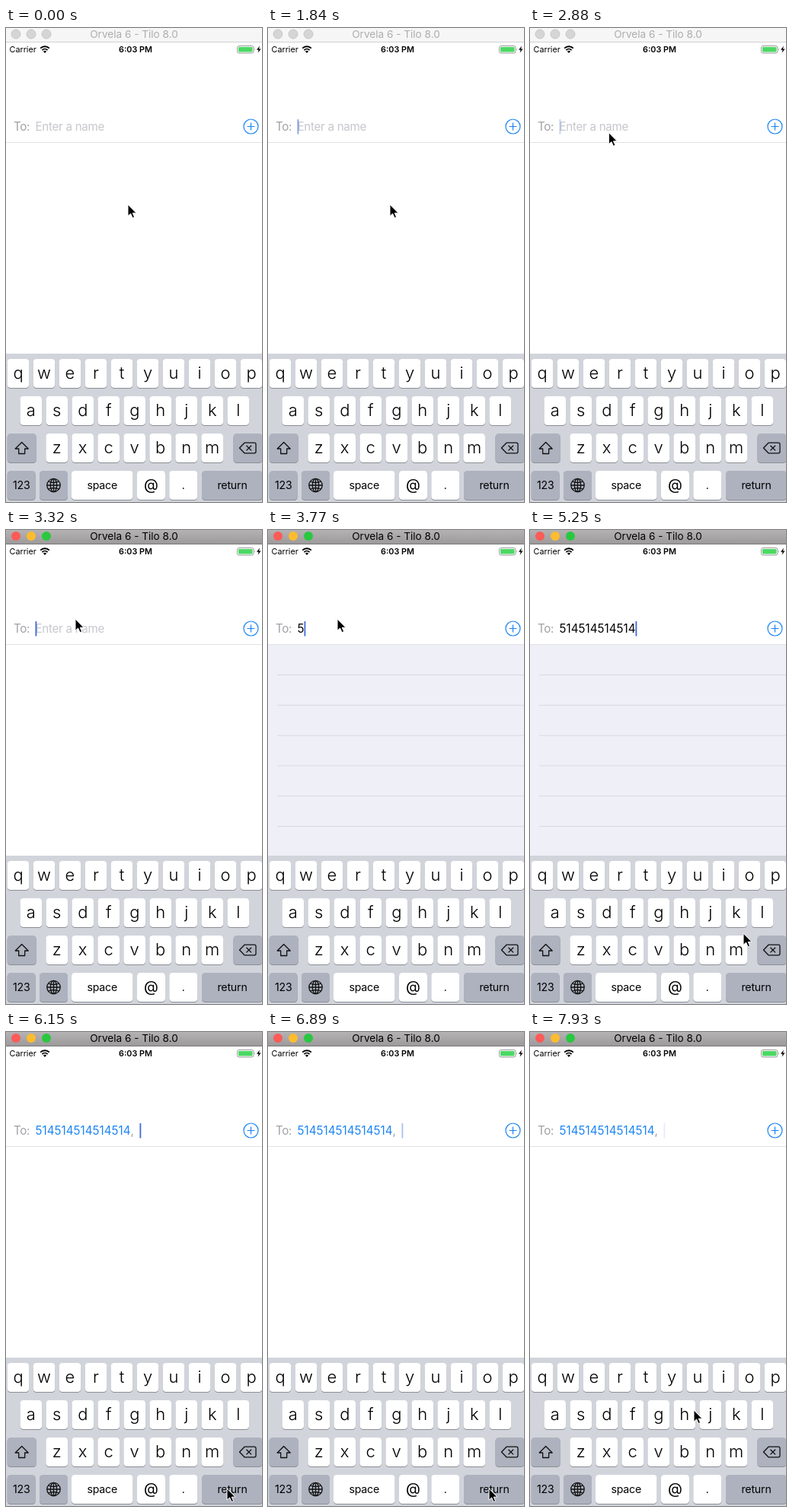
Write an HTML page that moves like this. It is 336x623 px and loops after 8 s.

```html
<!DOCTYPE html>
<html lang="en">
<head>
<meta charset="utf-8">
<title>Recipient field</title>
<style>
  html, body { margin: 0; height: 100%; overflow: hidden; background: #fff; }
  svg { display: block; width: 100vw; height: 100vh; font-family: Inter, Roboto, sans-serif; }
  .field { font-size: 15.2px; letter-spacing: -.3px; white-space: pre; }
  #entry { letter-spacing: 0; }
  .mid { text-anchor: middle; }
  .letter { font-size: 22px; font-weight: 300; }
  .sign { font-size: 19.5px; }
  .label { font-size: 14.2px; letter-spacing: -.2px; }
  .icon { fill: none; stroke: #111; stroke-width: 1.3; stroke-linejoin: round; }
</style>
</head>
<body>
<svg viewBox="0 0 336 623">
  <defs>
    <linearGradient id="chrome" x2="0" y2="1">
      <stop stop-color="#b5b2b4"/><stop offset="1" stop-color="#9d9a9c"/>
    </linearGradient>
  </defs>
  <rect width="336" height="623" fill="#fff"/>

  <rect id="bar" width="336" height="18"/>
  <rect id="barLine" y="18" width="336" height="1"/>
  <g id="lights">
    <circle cx="13" cy="8" r="6"/><circle cx="33" cy="8" r="6"/><circle cx="53" cy="8" r="6"/>
  </g>
  <text id="title" class="mid" x="168" y="13" font-size="13.6">Orvela 6 - Tilo 8.0</text>

  <g font-size="10.8">
    <text x="4.5" y="32">Carrier</text>
    <text class="mid" x="170" y="32" font-weight="600">6:03 PM</text>
  </g>
  <g fill="none" stroke="#000" stroke-width="1.9">
    <path d="M45.2 26.6a8.3 8.3 0 0 1 11.6 0M47.4 29.1a5.2 5.2 0 0 1 7.2 0"/>
    <path d="M51 33l-2.1-2.2a3 3 0 0 1 4.2 0z" fill="#000" stroke="none"/>
  </g>
  <rect x="303.5" y="23.5" width="21.5" height="9.5" rx="2.4" fill="none" stroke="#999"/>
  <rect x="305" y="25" width="18.5" height="6.5" rx="1" fill="#4cd964"/>
  <path d="M326 26.5q1.6 1.7 0 3.4z" fill="#999"/>
  <path d="M333 23.5l-4 5.3h2.6l-1 4 4-5.4h-2.6z"/>

  <g id="list">
    <rect y="151" width="336" height="277" fill="#efeff8"/>
    <path id="rows" stroke="#d9d9de"/>
  </g>
  <path d="M0 150.5H336" stroke="#e2e2e4"/>
  <g class="field">
    <text x="10" y="135" fill="#a0a0a5">To:</text>
    <text id="hint" x="38.5" y="135" fill="#c7c7cd">Enter a name</text>
    <text id="entry" x="38.5" y="135"></text>
    <text id="comma" y="135" fill="#a0a0a5">,</text>
  </g>
  <rect id="caret" y="120" width="1.8" height="19.5" fill="#4069dc"/>
  <path d="M316.5 129.5h10M321.5 124.5v10M312 129.5a9.5 9.5 0 0 1 19 0a9.5 9.5 0 0 1-19 0" fill="none" stroke="#1a84f4" stroke-width="1.2"/>

  <rect y="428" width="336" height="195" fill="#d1d4db"/>
  <g id="keys"></g>
  <path class="icon" d="M20.7 544.5l8.5 8.5h-4.5v6.5h-8v-6.5h-4.5z"/>
  <path class="icon" d="M306.5 552l6.5-6.8h13a2 2 0 0 1 2 2v9.6a2 2 0 0 1-2 2h-13zM315.5 548.8l6.6 6.6M322.1 548.8l-6.6 6.6"/>
  <g class="icon" transform="translate(62.5 601)">
    <circle r="8.7"/><ellipse rx="4.2" ry="8.7"/>
    <path d="M0-8.7V8.7M-8.7 0H8.7M-7-5Q0-2 7-5M-7 5Q0 2 7 5"/>
  </g>
  <path id="pointer" d="M0 0V15.2L3.6 12L6.1 17.6L8.6 16.5L6.2 11.2H11Z" fill="#000" stroke="#fff"/>
</svg>

<script>
const $ = id => document.getElementById(id);
const LOOP = 8000, TICK = 148.3, TICK_START = 55;   // the screen is refreshed once per tick
const BLINK = 1004, BLINK_START = 290, SOLID_UNTIL = 6350;
const ACTIVATE = 3000, TYPE = 3760, KEY_TIME = 134, PRESS = 5980, COMMIT = 6130;
const TEXT_X = 38.5, NUMBER = '514514514514514';

// Pointer stops: time, x, y
const stops = [
  [2290, 160, 232], [3300, 91, 117], [4200, 91, 117], [4350, 94, 120], [4800, 94, 120],
  [5245, 280, 530], [5700, 290, 600], [7000, 290, 600], [7470, 150, 505], [7910, 215, 497],
];

const clamp = v => Math.min(1, Math.max(0, v));
const easeOut = u => 1 - (1 - u) ** 2;

function pointerAt(t) {
  const next = stops.findIndex(s => s[0] > t);
  if (next < 1) return stops.at(next).slice(1);
  const [t0, x0, y0] = stops[next - 1], [t1, x1, y1] = stops[next];
  const u = easeOut((t - t0) / (t1 - t0));
  return [x0 + (x1 - x0) * u, y0 + (y1 - y0) * u];
}

function caretOpacity(t) {
  if (t >= TYPE && t < SOLID_UNTIL) return 1;
  const phase = (t - BLINK_START + BLINK) % BLINK;
  return clamp(1 - (phase - 500) / 110);
}

const typedCount = t => t < TYPE ? 0 : Math.min(NUMBER.length, 1 + Math.floor((t - TYPE) / KEY_TIME));

function key(x, row, w, label, dark, style = 'label', baseline = 24) {
  const y = 435 + row * 49;
  const box = (dy, fill, id = '') =>
    `<rect ${id} x="${x}" y="${y + dy}" width="${w}" height="38" rx="4.3" fill="${fill}"/>`;
  $('keys').innerHTML += box(1.1, '#8b8e94') +
    box(0, dark ? '#adb2be' : '#fff', label && `id="key-${label}"`) +
    `<text class="mid ${style}" x="${x + w / 2}" y="${y + baseline}">${label}</text>`;
}

['qwertyuiop', 'asdfghjkl', 'zxcvbnm'].forEach((letters, row) =>
  [...letters].forEach((c, i) => key([1.7, 18.5, 52.4][row] + i * 34, row, 28.6, c, false, 'letter', 25.5)));
key(1.7, 2, 38, '', true);
key(298.5, 2, 38, '', true);
key(1.7, 3, 37, '123', true);
key(44, 3, 37, '', true);
key(86, 3, 80.5, 'space');
key(172, 3, 37, '@', false, 'sign', 25);
key(214.3, 3, 37, '.');
key(257, 3, 80, 'return', true);
for (let y = 190.5, d = ''; y < 428; y += 39.8) $('rows').setAttribute('d', d += `M12 ${y}H336`);

const set = (id, attrs) => Object.entries(attrs).forEach(([k, v]) => $(id).setAttribute(k, v));
const show = (id, on) => set(id, { visibility: on ? 'visible' : 'hidden' });

function draw(t) {
  const active = t >= ACTIVATE, done = t >= COMMIT;
  set('bar', { fill: active ? 'url(#chrome)' : '#f6f6f6' });
  set('barLine', { fill: active ? '#777' : '#d2d2d2' });
  set('title', { fill: active ? '#000' : '#adadad' });
  [...$('lights').children].forEach((c, i) => {
    c.setAttribute('fill', active ? ['#fc5b57', '#fdbc2e', '#29c840'][i] : '#d5d5d5');
    c.setAttribute('stroke', active ? 'none' : '#c8c8c8');
  });

  const typed = typedCount(t);
  $('entry').textContent = NUMBER.slice(0, typed);
  set('entry', { fill: done ? '#1a84f4' : '#000' });
  const end = TEXT_X + (typed ? $('entry').getComputedTextLength() : 0);
  set('comma', { x: end });
  set('caret', { x: done ? end + 12 : end, opacity: caretOpacity(t) });
  show('hint', !typed);
  show('comma', done);
  show('list', typed && !done);
  set('key-return', { fill: t >= PRESS && !done ? '#fff' : '#adb2be' });
  set('pointer', { transform: `translate(${pointerAt(t).join(' ')})` });
}

(function loop() {
  const t = performance.now() % LOOP;
  draw(TICK_START + Math.floor((t - TICK_START) / TICK) * TICK);
  requestAnimationFrame(loop);
})();
</script>
</body>
</html>
```
